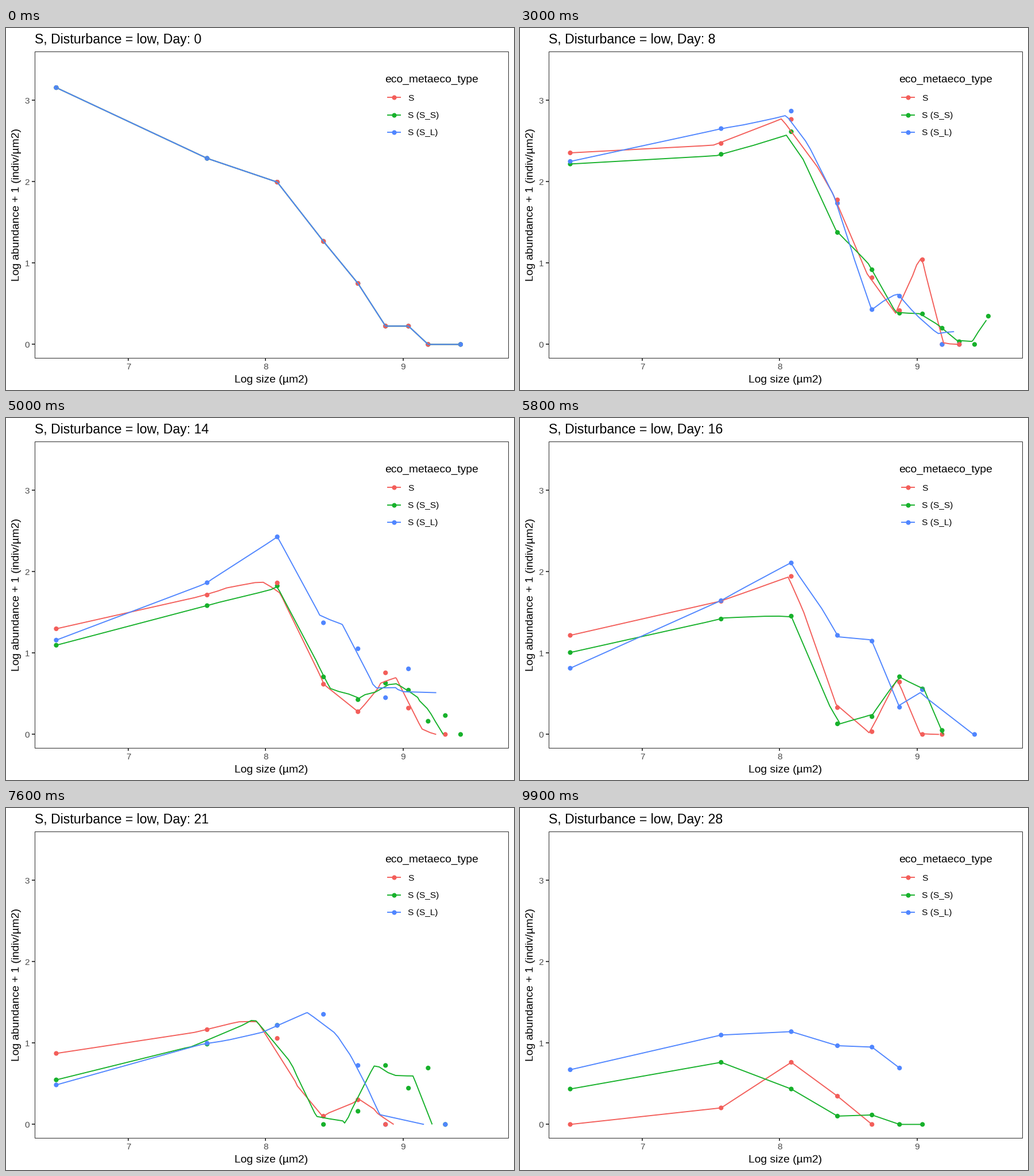
These frames come from a looping animation (885x632 px, 10 s). A matplotlib script:

```python
import numpy as np
import matplotlib.pyplot as plt
from matplotlib.animation import FuncAnimation
from matplotlib.patches import Rectangle

W, H, DPI = 885, 632, 100
FRAMES, LAST_DAY = 100, 28
COLORS = ["#F35E5A", "#17B12B", "#5086FF"]
LABELS = ["S", "S (S_S)", "S (S_L)"]
N = np.nan

# log abundance per size class, one row per sampling day (every 4 days)
START = [3.155, 2.286, 1.994, 1.266, .749, .225, .225, 0, N, 0]
ALONE = [
    START,
    [2.839, 3.38, 2.782, 1.579, .735, .347, N, 0, 0],
    [2.517, 2.586, 2.938, 1.918, .857, .347, 1.099, 0, 0],
    [1.372, 1.766, 1.727, .925, .598, .83, .693, N, 0],
    [1.233, 1.666, 1.979, .347, 0, .693, 0, 0],
    [1.008, 1.24, 1.461, .101, .47, 0],
    [.628, 1.028, .33, .102, 0, 0, 0],
    [0, .203, .763, .347, 0],
]
SMALL = [
    START,
    [2.49, 3.43, 2.954, 1.864, .63, 0, .2, .514, .347, 0, 0, 0],
    [2.393, 2.436, 2.673, 1.379, .963, .355, .348, .175, 0, 0, .347],
    [1.157, 1.738, 2.255, 1.354, .647, .556, .538, .347, .232, 0],
    [1.042, 1.446, 1.449, .14, .235, .695, .549, 0],
    [.54, 1.05, 1.51, 0, 0, .894, .693, .693, 0],
    [.56, .873, .693, 0, .454, .42, 0],
    [.435, .763, .435, .102, .116, 0, 0],
]
LARGE = [
    START,
    [2.81, 3.292, 2.789, 1.565, .347, 0, .347, 0, 0],
    [2.368, 2.749, 2.892, 1.762, .347, .6, N, 0, 0],
    [1.527, 2.068, 2.716, 1.569, .914, .556, 1.099],
    [.836, 1.686, 2.176, 1.199, 1.174, .36, .549, N, N, 0],
    [.516, 1.09, 1.209, 1.453, .794, 0, N, N, 0],
    [.43, .83, 1.231, 1.173, .6, 0],
    [.672, 1.098, 1.14, .967, .95, .693],
]
SERIES = [ALONE, SMALL, LARGE]
SIZES = np.log(649 * (2 * np.arange(12) + 1))
KEYS = [round(k * (FRAMES - 1) / 7) for k in range(8)]


def px(x):
    return 87.5 + 239.25 * (np.asarray(x) - SIZES[0])


def py(y):
    return 552.4 - 142.1 * np.asarray(y)


def densify(row, n=50):
    """Path through the row, filled up to n vertices evenly along its length."""
    y = np.array(row, float)
    x = SIZES[:len(y)][~np.isnan(y)]
    y = y[~np.isnan(y)]
    s = np.r_[0, np.cumsum(np.hypot(np.diff(x), np.diff(y)))]
    m = n - len(x)
    extra = (np.arange(m) + .5) * s[-1] / m
    at = np.sort(np.r_[s, extra])
    return np.array([np.interp(at, s, x), np.interp(at, s, y)])


PATHS = [[densify(row) for row in rows] for rows in SERIES]


def draw_order(k, day):
    if 2 <= k <= 8 and not (k == 7 and day > 6):
        return 1, 2, 0
    return (0, 2, 1) if k == 7 else (0, 1, 2)


fig = plt.figure(figsize=(W / DPI, H / DPI), dpi=DPI, facecolor="white")
ax = fig.add_axes([0, 0, 1, 1])
ax.set_xlim(0, W)
ax.set_ylim(H, 0)
ax.axis("off")
plt.rcParams["font.family"] = "Liberation Sans"


def text(x, y, s, size, color="black", **kw):
    return ax.text(x, y, s, fontsize=size * 72 / DPI, color=color,
                   family="Liberation Sans", va="baseline", **kw)


def stroke(x, y, color, width, **kw):
    return ax.plot(x, y, color=color, lw=width * 72 / DPI,
                   solid_capstyle="butt", solid_joinstyle="round", **kw)[0]


BASE, SMALL_TEXT = 19.3, 15.45
DOT = (8.2 * 72 / DPI) ** 2

ax.add_patch(Rectangle((50, 41), 825.2, 535.2, fill=False, ec="#333333",
                       lw=1.05 * 72 / DPI, zorder=4))
for v in (7, 8, 9):
    stroke([px(v)] * 2, [576.5, 581.2], "#333333", 1.8)
    text(px(v), 596.5, str(v), SMALL_TEXT, "#4D4D4D", ha="center")
for v in range(4):
    stroke([45, 49.7], [py(v)] * 2, "#333333", 1.8)
    text(41, py(v) + 5.5, str(v), SMALL_TEXT, "#4D4D4D", ha="right")

text(462.3, 619, "Log size (µm2)", BASE, ha="center")
text(23.5, 308.7, "Log abundance + 1 (indiv/µm2)", BASE, ha="center",
     rotation=90, rotation_mode="anchor")
title = text(49.5, 26.5, "", 23.15)

text(660, 94.5, "eco_metaeco_type", BASE)
for i, (label, color) in enumerate(zip(LABELS, COLORS)):
    y = 121.2 + 30.3 * i
    stroke([663.6, 688], [y, y], color, 1.9)
    ax.scatter([675.8], [y], s=DOT, color=color, lw=0)
    text(700, y + 5.5, label, SMALL_TEXT)

dots = ax.scatter([], [], s=DOT, lw=0, zorder=2)
lines = [stroke([], [], c, 1.9, zorder=3) for c in COLORS]


def update(frame):
    day = LAST_DAY * frame / (FRAMES - 1)
    title.set_text(f"S, Disturbance = low, Day: {round(day)}")
    a = max(k for k in range(8) if KEYS[k] <= frame)
    b = min(a + 1, 7)
    t = (frame - KEYS[a]) / (KEYS[b] - KEYS[a]) if b > a else 0

    for line, paths in zip(lines, PATHS):
        x, y = paths[a] + t * (paths[b] - paths[a])
        line.set_data(px(x), py(y))

    # leaving dots wait in place until the next sampling day
    spots, colors = [], []
    for k, size in enumerate(SIZES):
        for g in draw_order(k, day):
            now, nxt = SERIES[g][a], SERIES[g][b]
            if k >= len(now) or np.isnan(now[k]):
                continue
            y = now[k]
            if k < len(nxt) and not np.isnan(nxt[k]):
                y += t * (nxt[k] - y)
            spots.append((px(size), py(y)))
            colors.append(COLORS[g])
    dots.set_offsets(spots)
    dots.set_facecolors(colors)
    return [title, dots, *lines]


anim = FuncAnimation(fig, update, frames=FRAMES, interval=100,
                     repeat=True, repeat_delay=0, blit=False)
plt.show()
```
